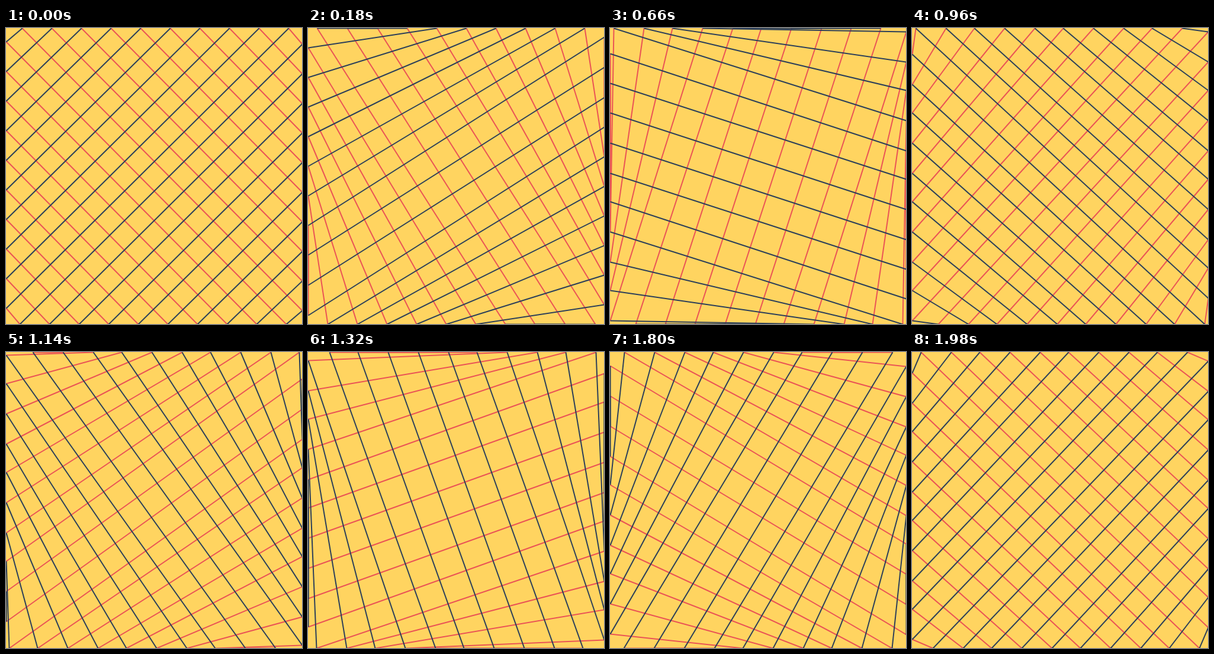
An HTML page with a canvas that plays this animation: 500 by 500 pixels, repeating every 2.04 s.

```html
<!DOCTYPE html>
<html lang="en">
<head>
<meta charset="utf-8">
<title>Woven lines</title>
<style>
  html, body { margin: 0; width: 100%; height: 100%; overflow: hidden; background: #ffd460; }
  canvas { display: block; }
</style>
</head>
<body>
<canvas id="stage" width="500" height="500"></canvas>
<script>
const SIZE = 500, COUNT = 40, GAP = 50, SHIFT = 27;
const STEP = 3, STEPS_PER_TICK = 10, TICK = 60, LOOP = 2040;
const SIDE_STEPS = Math.ceil(SIZE / STEP);
const RED = '#ea5455', NAVY = '#2d4059';
const ctx = document.getElementById('stage').getContext('2d');

// Coordinates refer to pixel centres.
ctx.translate(0.5, 0.5);
ctx.lineWidth = 2;

// Points walk clockwise around the border and snap to each corner they reach.
function pointAt(index, steps) {
  const start = SHIFT + GAP * index;
  let side = Math.floor(start / SIZE);
  let along = start % SIZE;
  const toCorner = Math.ceil((SIZE - along) / STEP);
  if (steps < toCorner) {
    along += STEP * steps;
  } else {
    const rest = steps - toCorner;
    side += 1 + Math.floor(rest / SIDE_STEPS);
    along = STEP * (rest % SIDE_STEPS);
  }
  return [
    [along, 0],
    [SIZE, along],
    [SIZE - along, SIZE],
    [0, SIZE - along]
  ][side % 4];
}

// Joins every pair of points whose indices add up to sum, modulo COUNT.
function drawChords(points, sum, color) {
  ctx.strokeStyle = color;
  for (let i = 0; i < COUNT; i++) {
    const j = (sum - i + COUNT) % COUNT;
    if (j < i) continue;
    ctx.beginPath();
    ctx.moveTo(...points[i]);
    ctx.lineTo(...points[j]);
    ctx.stroke();
  }
}

function draw(time) {
  const steps = Math.floor((time % LOOP) / TICK) * STEPS_PER_TICK;
  const points = Array.from({ length: COUNT }, (_, i) => pointAt(i, steps));
  ctx.fillStyle = '#ffd460';
  ctx.fillRect(-1, -1, SIZE + 2, SIZE + 2);
  drawChords(points, COUNT / 2 - 1, RED);
  drawChords(points, COUNT - 1, NAVY);
}

const begin = performance.now();
function loop() {
  draw(performance.now() - begin);
  requestAnimationFrame(loop);
}
loop();
</script>
</body>
</html>
```
